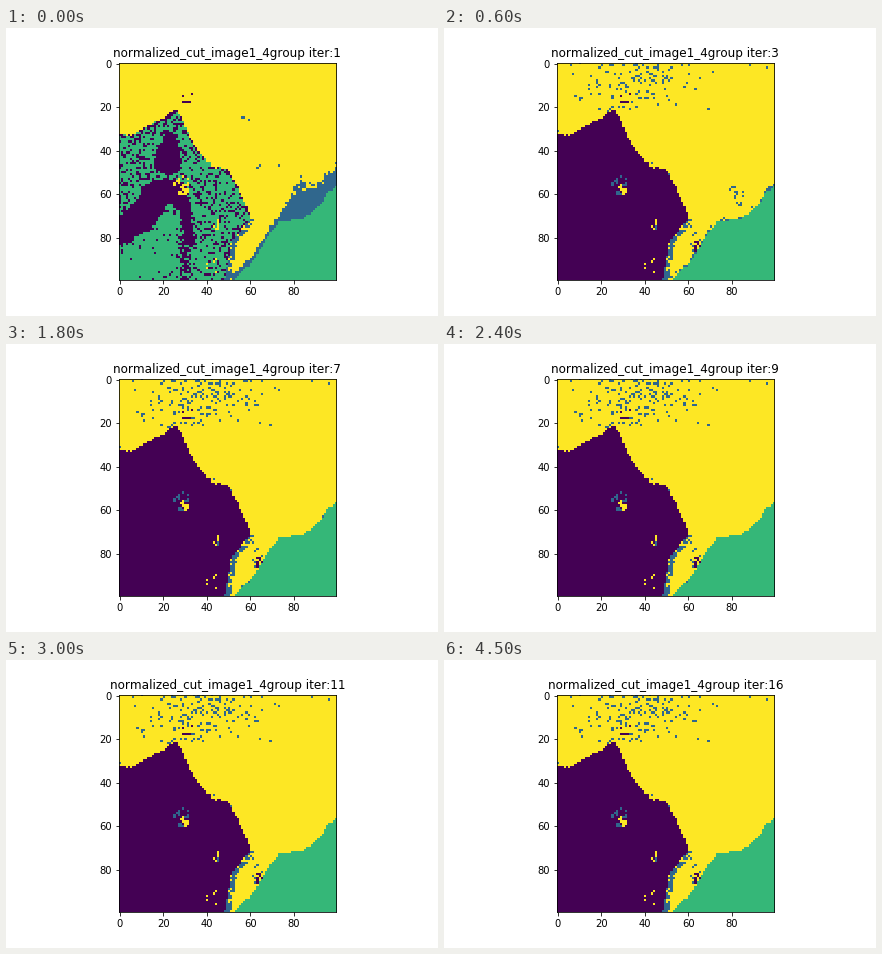
Recreate the animation shown at these times as a matplotlib script. Size 432x288 px, loop 4800 ms.

```python
import numpy as np
import matplotlib.pyplot as plt
from matplotlib.animation import FuncAnimation

N = 100
STEPS = 16
PURPLE, BLUE, GREEN, YELLOW = range(4)

rng = np.random.default_rng(12)
Y, X = np.mgrid[0:N, 0:N]
u, v = rng.random((2, N, N))
wobble = rng.uniform(-0.5, 0.5, N)


def curve(at, *points):
    return np.interp(at, *zip(*points))


def bump(at, middle, width):
    return np.exp(-((at - middle) / width) ** 2)


def cluster(x, y, rx, ry, chance):
    """Scattered cells inside an ellipse."""
    inside = ((X - x) / rx) ** 2 + ((Y - y) / ry) ** 2 < 1
    return inside & (rng.random((N, N)) < chance)


def stroke(*knots):
    """Rough brush stroke through knots of (x, y, radius)."""
    mask = np.zeros((N, N), bool)
    ends = np.arange(len(knots))
    for t in np.linspace(0, ends[-1], 60):
        x, y, r = (np.interp(t, ends, part) for part in zip(*knots))
        mask |= np.hypot(X - x, Y - y) < r + 1.4 * (v - 0.5)
    return mask


# Outlines of the mountain and the hill
ridge = curve(X, (0, 33), (6, 32.6), (20, 25), (26, 21), (34, 38), (42, 47.3),
              (50, 49), (57, 63), (60, 71)) + wobble[X]
flank = curve(Y, (70, 60.5), (76, 56), (83, 50.5), (99, 48)) + wobble[Y]
hill = curve(X, (52, 99.5), (60, 92), (66, 83), (70, 76), (73, 73), (84, 71),
             (91, 66), (96, 58.5), (99, 57)) + 0.6 * wobble[X]
mountain = (X <= 60) & (Y >= ridge) & ((Y < 70) | (X <= flank))
above_ridge = ridge - Y
above_hill = np.where(X > 51, hill - Y, N)
gap = X - flank
flank_rim = (Y > 71) & (gap > 0) & (gap < 2.6) & (v < 0.85)

# Sky speckle thins out away from a slanted band, with a faint even floor
sky = 0.22 * bump(X, 42 - 0.6 * Y, 18) * np.clip((23 - Y) / 6, 0, 1)
sky += 0.012 * np.clip(1 - Y / 28, 0, 1)

dark = stroke((23, 35, 3.5), (22, 45, 6.5))
dark |= stroke((0, 77, 6.5), (10, 71, 6.5), (17, 60, 6.5), (25, 58, 4.5),
               (30, 68, 2.8), (32, 82, 2))
gold = stroke((29, 57, 0.9), (30.5, 59.5, 0.9))
gold |= cluster(44, 74, 2, 3, 0.35) | cluster(42, 95, 4, 6, 0.12)
fringe = cluster(28, 56, 4, 5, 0.3) | cluster(44, 74, 2, 3, 0.25)
ink = cluster(31, 16, 4, 3, 0.18)
faint = cluster(69, 46, 7, 5, 0.09) | cluster(58, 26, 4, 2, 0.2)
valley = cluster(64, 84, 2, 3, 0.35)
valley_blue = cluster(62, 80, 4, 7, 0.1)
by_hill = cluster(82, 61, 4, 5, 0.16)


def haze():
    limit = np.clip(2.5 * (X - 72), 3.2, 11) + 9 * bump(X, 83, 4)
    fade = 1.15 - np.clip(above_hill / limit, 0, 2) ** 3
    return (above_hill > 0) & (u < fade)


def rock():
    chance = 0.22 - 0.16 * (X < 28) * (Y > 68)
    chance = chance + 0.15 * (Y < 34) + 0.45 * bump(X, 30, 3) * (Y > 78)
    edge = (above_ridge > -1.3) | ((Y > 70) & (gap > -1))
    return np.where(dark | (u < np.where(edge, 0.75, chance)), PURPLE, GREEN)


def labels(step):
    first = step == 1
    grid = np.full((N, N), YELLOW)
    if first:
        grid[haze() | faint] = BLUE
    else:
        rate = 1 - 0.85 * np.exp(2 - step) - 0.01 * (min(step, 15) - 2)
        grid[u < rate * sky] = BLUE
        near_hill = (above_hill > 0) & (above_hill < 1.6)
        grid[near_hill & (v < 0.65 * 0.55 ** (step - 2))] = BLUE
        grid[(above_ridge < 1.6) & (X < 60) & (v < 0.08) & (Y < 70)] = BLUE
        if step < 4:
            grid[by_hill] = BLUE
        grid[valley_blue] = BLUE
        grid[valley] = PURPLE
    grid[flank_rim] = BLUE
    grid[ink] = PURPLE
    grid[above_hill <= 0] = GREEN
    grid = np.where(mountain, rock() if first else PURPLE, grid)
    grid[fringe & mountain] = YELLOW if first else BLUE
    grid[gold] = YELLOW
    return grid


maps = [labels(k + 1) for k in range(STEPS)]

plt.rcParams["font.family"] = "DejaVu Sans"
plt.rcParams["text.kerning_factor"] = 6
fig, ax = plt.subplots(figsize=(6, 4), dpi=72)
fig.subplots_adjust(left=0.125, right=0.9, bottom=0.125, top=0.88)
image = ax.imshow(maps[0], cmap="viridis", vmin=0, vmax=3, interpolation="nearest")
title = ax.set_title("")


def draw(k):
    image.set_data(maps[k])
    title.set_text(f"normalized_cut_image1_4group iter:{k + 1}")
    return image, title


anim = FuncAnimation(fig, draw, frames=STEPS, interval=300, repeat=True,
                     repeat_delay=0, blit=False)
plt.show()
```
